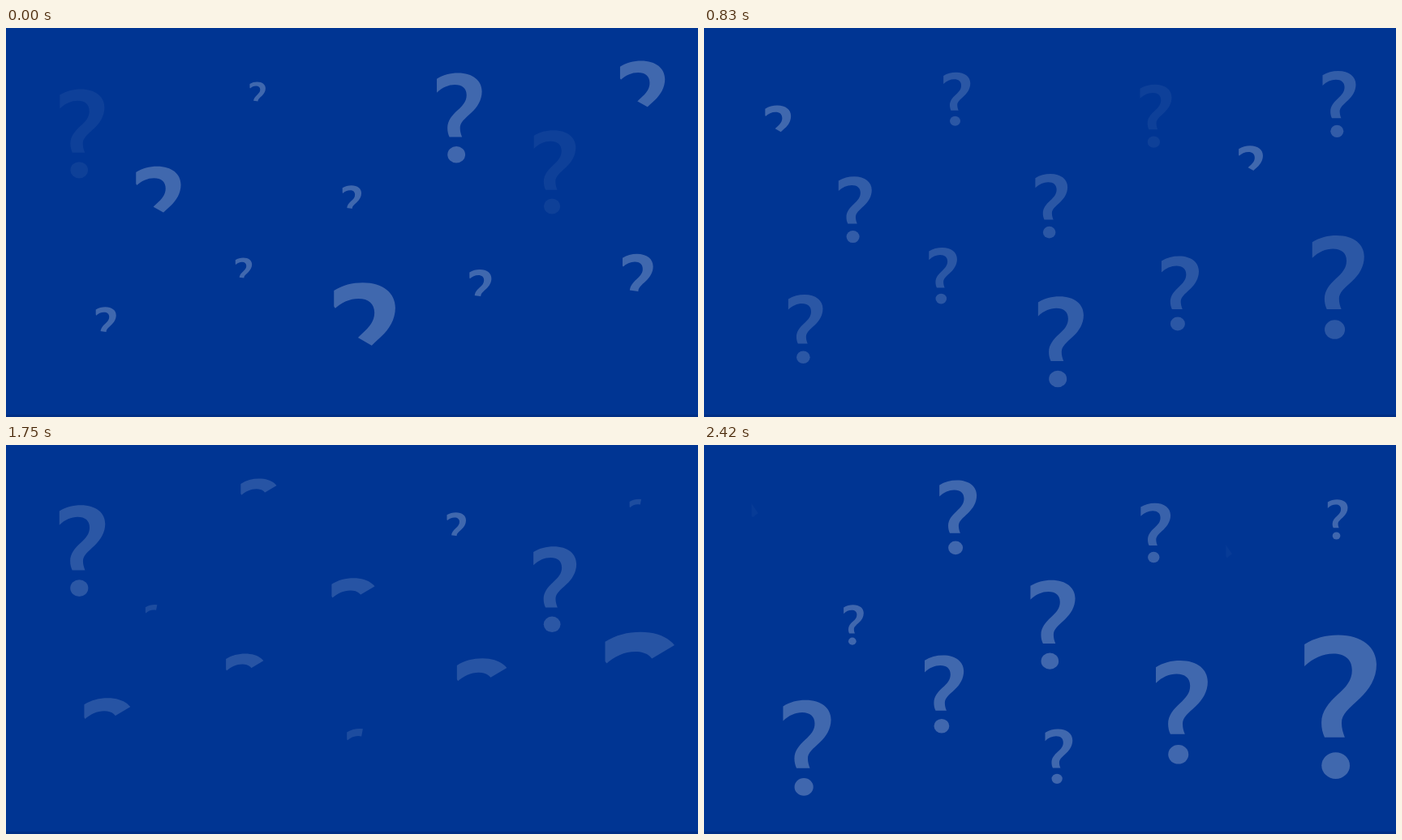
Animation of 853x480 px, one loop 2510 ms. Source, as an HTML page with a canvas:

```html
<!DOCTYPE html>
<html lang="en">
<head>
<meta charset="utf-8">
<title>Question marks</title>
<style>
  html, body { margin: 0; width: 100%; height: 100%; overflow: hidden; background: #003593; }
  canvas { display: block; }
</style>
</head>
<body>
<canvas id="stage" width="853" height="480"></canvas>
<script>
const ctx = document.getElementById('stage').getContext('2d');
const LOOP = 2510, FRAMES = 30, CYCLE = 25;

// Glyph in units of its own height, top left at 0,0
const hook = new Path2D(
  'M0 .065C.07 .02 .15 0 .235 0C.4 0 .5 .085 .5 .205C.5 .3 .45 .38 .385 .44' +
  'C.31 .51 .258 .55 .258 .61C.258 .65 .268 .68 .28 .711L.14 .711' +
  'C.126 .68 .118 .65 .118 .61C.118 .53 .17 .47 .23 .415' +
  'C.29 .36 .33 .315 .33 .245C.33 .17 .28 .13 .2 .13C.13 .13 .06 .16 0 .218Z');
const dot = new Path2D();
dot.ellipse(.217, .907, .098, .092, 0, 0, 7);
// Centre line along which the hook is written
const spine = new Path2D(
  'M-.03 .16C.06 .085 .14 .055 .22 .055C.32 .055 .36 .09 .395 .165' +
  'C.43 .24 .41 .31 .33 .385C.27 .44 .25 .47 .235 .505' +
  'C.2 .57 .19 .6 .195 .64L.2 .74');
const ANCHOR = [.194, .434];

// Groups share a phase offset and a direction of scaling before the turn
const groups = [
  { offset: 0, grows: true, marks: [
    [308, 83.4, 105], [423.8, 214.5, 126], [290.7, 301.2, 110],
    [120.4, 366, 135], [581.8, 321.4, 146], [774.6, 311.5, 203]] },
  { offset: -1, grows: false, marks: [
    [433.6, 379.9, 150.5], [778.4, 88.6, 110], [181.7, 218.8, 110]] },
  { offset: 4, grows: false, marks: [[552.6, 103.7, 127]] },
  { offset: 14, grows: false, marks: [[87.7, 123.2, 179], [670.7, 171.2, 168]] }
];

const mod = (a, n) => ((a % n) + n) % n;

function drawMark(x, y, size, alpha, phase) {
  const written = .135 * (phase - .55);
  if (alpha <= 0 || written <= 0) return;
  ctx.save();
  ctx.translate(x, y);
  ctx.scale(size, size);
  ctx.translate(-ANCHOR[0], -ANCHOR[1]);
  ctx.globalAlpha = alpha;
  ctx.fillStyle = ctx.strokeStyle = '#fff';
  if (phase >= 10) ctx.fill(dot);
  if (phase >= 9) {
    ctx.fill(hook);
  } else {
    ctx.clip(hook);
    ctx.lineWidth = .26;
    ctx.setLineDash([written, 9]);
    ctx.stroke(spine);
  }
  ctx.restore();
}

function draw(frame) {
  ctx.fillStyle = '#003593';
  ctx.fillRect(0, 0, 853, 480);
  ctx.fillStyle = '#002f85';
  ctx.fillRect(0, 477, 853, 3);
  for (const { offset, grows, marks } of groups) {
    const phase = mod(frame + offset - 17, CYCLE);
    const alpha = .25 * Math.min(1, (phase - .3) / 6, (24 - phase) / 9);
    const shift = .026 * Math.abs(frame + offset - 24.2);
    const scale = grows ? 1 - shift : .35 + shift;
    for (const [x, y, h] of marks) drawMark(x, y, h * scale, alpha, phase);
  }
}

// Twelve steps per second, on a 10 ms grid
function frameAt(ms) {
  let k = 0;
  while (k < FRAMES - 1 && Math.round((k + 1) * 25 / 3) * 10 <= ms) k++;
  return k;
}

const start = performance.now();
function tick() {
  draw(frameAt((performance.now() - start) % LOOP));
  requestAnimationFrame(tick);
}
tick();
</script>
</body>
</html>
```
